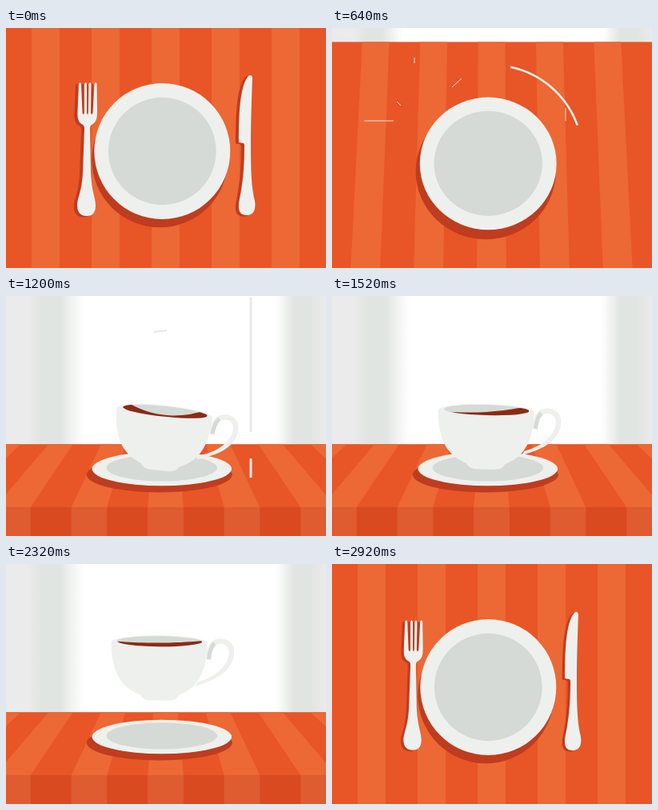
An HTML page with a canvas that plays this animation: 400x300 px, repeating every 2960 ms.

```html
<!DOCTYPE html>
<html>
<head>
<meta charset="utf-8">
<style>
html, body { margin: 0; width: 100%; height: 100%; overflow: hidden; background: #fff; }
canvas { display: block; width: 400px; height: 300px; }
</style>
</head>
<body>
<canvas id="stage" width="400" height="300"></canvas>
<script>
const g = document.getElementById('stage').getContext('2d');
const LOOP = 2960;
const CHINA = '#eef0ed', GREY = '#d5dad6', SHADE = '#bf3c1e', TRAIL = '#e6e9e6';
const clamp = (v, a = 0, b = 1) => Math.min(b, Math.max(a, v));
const ramp = (t, start, length) => clamp((t - start) / length);
const rad = Math.PI / 180;

const fork = new Path2D('M91 70Q92.5 66 94 70L95.5 106Q97 110 98 106L98 70Q99.5 66 101 70L101 106Q102 110 103 106L103.5 70Q105 66 106.5 70L106 106Q107 110 108.5 106L110.5 70Q112 66 113.5 70L114 104C114 115 112 118 107 121Q105 122 105 126L106 180C107 205 112 212 112 222C112 232 107 235 101 235C95 235 89 232 89 222C89 212 95 205 96 180L98 126Q98 122 96 121C91 118 89 115 89.5 104Z');
const knife = new Path2D('M303 60Q307 57 308 62C307 90 306 120 306 145C306 180 307 200 311 216C313 229 308 234 301 234C293 234 290 229 291 219C295 200 298 180 298 146L297 144L291 143C291 110 292 72 303 60Z');
const body = new Path2D('M131 142C131 182 146 200 168 208Q170 214 180 215L204 215Q214 214 216 208C237 200 251 182 251 142Z');
const handle = new Path2D('M250 163C250 140 260 137 268 137C289 138 288 161 278 173C268 186 254 190 236 197L240 191C254 187 264 181 272 171C281 160 281 144 268 143.5C261 143.5 257 147 256 163Z');
const handleShade = new Path2D('M253 163C254 152 256 147 260 143');

// time of full length, x1, y1, x2, y2, width
const sparks = [
  [640, 103, 37, 103, 44, 1], [640, 150, 74, 162, 63, 1], [640, 81, 92, 86, 97, 1],
  [640, 40, 116, 77, 116, 1], [640, 292, 116, 292, 100, 1],
  [840, 25, 116, 39, 116, .6], [840, 241, 123, 273, 157, 1.2], [840, 44, 169, 49, 165, 1.1],
  [840, 213, 179, 250, 179, 1.1], [840, 155, 175, 157, 175, 1], [840, 370, 179, 372, 179, 1],
  [840, 103, 192, 103, 195, 1],
  [1200, 184, 45, 201, 43, 2.2], [1200, 306, 203, 306, 227, 3],
  [2520, 181.5, 52, 181.5, 36, 1.7], [2520, 247, 108, 280, 78, 1.7], [2520, 147.5, 128, 152.5, 134, 1.6],
  [2520, 94, 166.4, 313, 166.4, 1.5]
];

function ellipse(x, y, rx, ry, color) {
  g.fillStyle = color;
  g.beginPath();
  g.ellipse(x, y, rx, ry, 0, 0, 7);
  g.fill();
}

function line(x1, y1, x2, y2, width) {
  g.lineWidth = width;
  g.beginPath();
  g.moveTo(x1, y1);
  g.lineTo(x2, y2);
  g.stroke();
}

// 0 = seen from above, 1 = seen from the side
function tilt(t) {
  if (t < 2384) return 1 - (1 - ramp(t, 584, 400) ** 1.4) ** 3;
  const u = ramp(t, 2384, 400);
  return 1 - u * u * (3 - 2 * u);
}

function view(p) {
  const c = Math.cos(76.7 * rad * p), s = Math.sin(76.7 * rad * p);
  const pivot = 105 + 101.5 * (p - .69 * p * (1 - p) ** 3);
  const at = v => {
    const scale = 816 / (816 - (v - 16) * s);
    return { scale, y: pivot + v * c * scale };
  };
  return { p, c, s, at };
}

function drawWall(p) {
  g.fillStyle = '#fff';
  g.fillRect(0, 0, 400, 300);
  const w = g.createLinearGradient(0, 0, 400, 0);
  const stops = [[0, '#ebebeb'], [28, '#eaebea'], [44, '#e1e5e1'], [62 + 6 * p, '#e1e5e1'],
    [78 + 7 * p, '#f4f6f4'], [86 + 12 * p, '#fff'], [340 - 4 * p, '#fff'], [346, '#f4f6f4'],
    [360, '#e1e5e1'], [382, '#e1e5e1'], [400, '#ebebeb']];
  for (const [x, color] of stops) w.addColorStop(x / 400, color);
  g.fillStyle = w;
  g.fillRect(0, 0, 400, 300);
}

function drawTable({ at }) {
  const back = at(-106), front = at(196);
  const edge = (k, q) => 199.5 + k * 75 * q.scale;
  g.fillStyle = '#e85527';
  g.fillRect(0, back.y, 400, 400);
  g.fillStyle = '#d94a21';
  g.fillRect(0, front.y, 400, 300);
  for (let k = -4; k < 5; k++) {
    const a = k - .234, b = k + .234;
    g.fillStyle = '#ec6835';
    g.beginPath();
    g.moveTo(edge(a, back), back.y);
    g.lineTo(edge(b, back), back.y);
    g.lineTo(edge(b, front), front.y);
    g.lineTo(edge(a, front), front.y);
    g.fill();
    g.fillStyle = '#de5c2f';
    g.fillRect(edge(a, front), front.y, edge(b, front) - edge(a, front), 300);
  }
}

function drawTrails(t) {
  g.strokeStyle = TRAIL;
  for (const [time, x1, y1, x2, y2, width] of sparks) {
    const u = (t - time) / 120;
    if (Math.abs(u) >= 1) continue;
    const a = Math.max(0, u), b = 1 + Math.min(0, u);
    const dx = x2 - x1, dy = y2 - y1;
    line(x1 + dx * a, y1 + dy * a, x1 + dx * b, y1 + dy * b, width);
  }
  // circular sweep around the plate
  const head = Math.min(260, -21 + 1.22 * (t - 640));
  const tail = t < 840 ? Math.max(-80, -78.6 + .383 * (t - 640)) : -2 + 2 * (t - 840);
  if (head > tail) {
    g.save();
    g.beginPath();
    g.rect(0, 0, 400, 206);
    g.clip();
    g.strokeStyle = '#edefed';
    g.lineWidth = 2.6;
    g.beginPath();
    g.arc(199.8, 160, 113.6, tail * rad, head * rad);
    g.stroke();
    g.restore();
  }
  // streak beside the falling cup
  const top = Math.max(0, (t - 1200) * 1.5);
  const end = 170 * ramp(t, 1080, 120) + Math.max(0, t - 1200) * .25;
  if (end > top) line(306, top, 306, end, 3);
}

function drawPlate({ p, c, at }) {
  const y = at(49).y - 2.2 * p - 13 * p * (1 - p) + 108 * p * (1 - p) ** 5;
  const r = 85 + 2.3 * p, shadow = 85 + 6 * Math.sqrt(p), rim = 1.2 * p ** 4;
  const x = 195.3 - .5 * p;
  ellipse(x - 3, y + 10.3 - 3 * p, shadow, shadow * c + rim, SHADE);
  ellipse(x, y, r, r * c + rim, CHINA);
  ellipse(x, y - 1.2 * p, r * .793, r * .79 * c + rim * .6, GREY);
}

function drawCup(t) {
  if (t < 960 || t > 2460) return;
  const drop = 1 - ramp(t, 960, 160) ** 2, leave = ramp(t, 2240, 200) ** 2;
  const phase = (t - 1200) / 388.6 * 2 * Math.PI, decay = Math.exp((1200 - t) / 500);
  const squash = .04 * Math.sin(Math.PI * ramp(t, 2140, 130));
  g.save();
  g.translate(192, 212 + 3 * decay * (t > 1120 && t < 2240) - 250 * drop - 270 * leave);
  g.rotate(6 * rad * Math.cos(phase) * Math.min(1.2, decay));
  g.scale(1 + squash, 1 - squash);
  g.translate(-192, -212);
  g.fillStyle = CHINA;
  g.fill(handle);
  g.strokeStyle = GREY;
  g.lineWidth = 5;
  g.stroke(handleShade);
  g.fill(body);
  ellipse(191, 142.5, 60, 9, CHINA);
  ellipse(191.5, 141, 53, 6.5, GREY);
  g.clip();
  const slope = 10 * Math.sin(phase) * decay, wave = 2.9 * Math.cos(phase) * decay + .3;
  g.fillStyle = '#8a2b16';
  g.beginPath();
  g.moveTo(138, 160);
  for (let n = -1; n <= 1.01; n += .1)
    g.lineTo(191.5 + 53 * n, 142.3 + slope * n + wave * (1 - 4 * n * n));
  g.lineTo(245, 160);
  g.fill();
  g.restore();
}

function drawCutlery(t) {
  if (t > 480 && t < 2620) return;
  const lift = t < 1000 ? ramp(t, 40, 440) ** 2 : (1 - ramp(t, 2620, 180)) ** 2;
  const press = Math.sin(Math.PI * ramp(t, 2800, 160));
  const piece = (path, x, dir, dip) => {
    const put = (dx, dy, scale, color) => {
      g.save();
      g.translate(x + dx, 151 + dy);
      g.rotate(dir * .5 * lift);
      g.scale(scale, scale);
      g.translate(-x, -151);
      g.fillStyle = color;
      g.fill(path);
      g.restore();
    };
    const scale = 1 + .6 * lift - dip * press;
    if (lift < .4) {
      g.globalAlpha = 1 - lift / .4;
      put(-4 - 40 * lift + press, 1.5 + 80 * lift, scale, SHADE);
      g.globalAlpha = 1;
    }
    put(dir * 70 * lift, -330 * lift, scale, CHINA);
  };
  piece(fork, 101, -1, .04);
  piece(knife, 301, 1, .015);
}

function frame(now) {
  const t = now % LOOP, v = view(tilt(t));
  drawWall(v.p);
  drawTable(v);
  drawTrails(t);
  drawPlate(v);
  drawCup(t);
  drawCutlery(t);
}

const start = performance.now();
function tick() {
  frame(performance.now() - start);
  requestAnimationFrame(tick);
}
tick();
</script>
</body>
</html>
```
